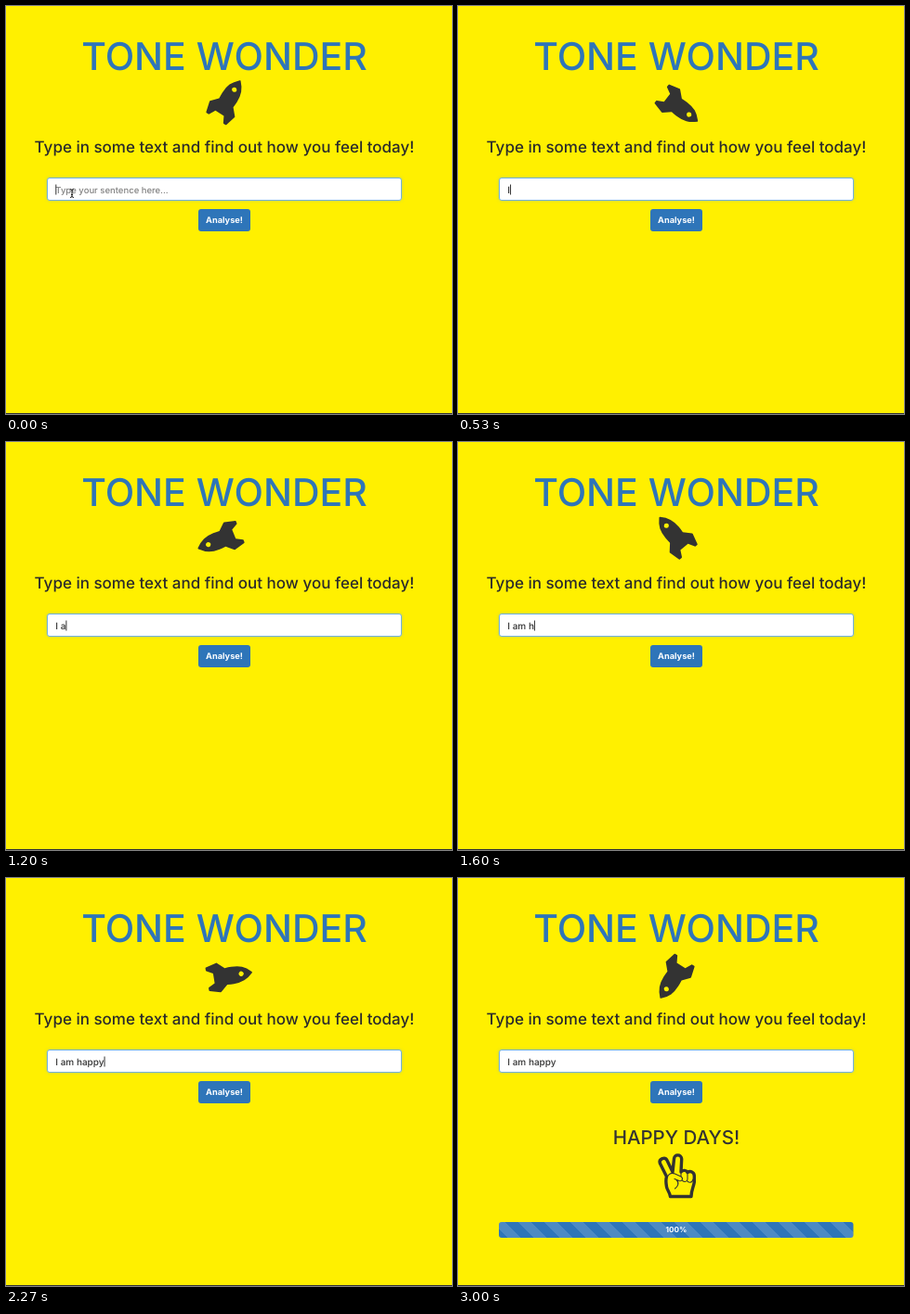
These frames come from a looping animation (480 px wide and 440 px high, 3.07 s). An HTML page:

```html
<!DOCTYPE html>
<html lang="en">
<head>
<meta charset="utf-8">
<title>Tone Wonder</title>
<style>
  html, body { margin: 0; width: 100%; height: 100%; overflow: hidden; background: #fff000; }
  svg { display: block; }
  text {
    font-family: Inter, "Open Sans", sans-serif;
    font-weight: 500;
    font-optical-sizing: none;
    text-rendering: geometricPrecision;
    fill: #333;
    white-space: pre;
  }
  .mid { text-anchor: middle; }
  .title { font-size: 41px; fill: #2e75b9; }
  .tagline { font-size: 17px; fill: #2b2b2b; }
  .hint { font-size: 9.5px; fill: #808080; }
  .typed { font-size: 10px; }
  .label { font-size: 9.2px; font-weight: 700; fill: #fff; }
  .verdict { font-size: 20.5px; }
  .percent { font-size: 8.2px; font-weight: 700; fill: #fff; }
  .field { fill: #fff; stroke: #72b0e0; filter: drop-shadow(0 0 1.5px rgba(102, 175, 233, .5)); }
  .hand { fill: none; stroke: #333; stroke-linejoin: round; stroke-linecap: round; }
</style>
</head>
<body>
<svg width="480" height="440" viewBox="0 0 480 440">
  <defs>
    <pattern id="stripes" width="28" height="28" patternUnits="userSpaceOnUse">
      <rect width="14" height="28" fill="#fff" fill-opacity=".15"/>
    </pattern>
  </defs>
  <rect width="480" height="440" fill="#fff000"/>
  <rect y="439" width="480" height="1" fill="#333"/>

  <text class="mid title" x="235" y="68.6">TONE WONDER</text>
  <path id="rocket" fill="#333" fill-rule="evenodd" d="M1440 1088a96 96 0 1 0-192 0a96 96 0 1 0 192 0z
    M1671 1376q0-249-75.5-430.5t-253.5-360.5q-81-80-195-176l-20-379q-2-16-16-26l-384-224q-7-4-16-4
    q-12 0-23 9l-64 64q-13 14-8 32l85 276l-281 281l-276-85q-3-1-9-1q-14 0-23 9l-64 64q-17 19-5 39
    l224 384q10 14 26 16l379 20q96 114 176 195q188 187 358 258t431 71q14 0 24-9.5t10-22.5z"/>
  <text class="mid tagline" x="235" y="158">Type in some text and find out how you feel today!</text>

  <rect class="field" x="44.5" y="185.5" width="381" height="24" rx="2.5"/>
  <text class="hint" id="hint" x="53.3" y="201.5">Type your sentence here...</text>
  <text class="typed" id="typed" x="53.3" y="201.5"></text>
  <rect id="caret" y="192.5" width="1" height="11" fill="#333"/>
  <path id="pointer" d="M69 197.5q2 0 2 1.5v6q0 1.5-2 1.5M73 197.5q-2 0-2 1.5M73 206.5q-2 0-2-1.5M70 203.5h2"
    fill="none" stroke="#222"/>

  <rect x="207" y="219" width="56" height="24" rx="3" fill="#2e75b9"/>
  <text class="mid label" x="235" y="234.3">Analyse!</text>

  <g id="result">
    <text class="mid verdict" x="235" y="287">HAPPY DAYS!</text>
    <g class="hand" transform="translate(215 297)">
      <path stroke-width="3.4" d="M9.5 25L2.3 10.5C.9 6 7.8 3 10 7.5L16 20L17.5 6C17.5 .5 25.5 .5 25.7 6
        L25 20C27 17.5 31 18 32 20.5C35 18.5 39 20 39.3 24V31C38.5 36 36 40 36 46.5H13.5
        C13 42 10 39.5 9.5 36C8.8 32 8.5 28 9.5 25z"/>
      <path stroke-width="1.1" d="M10.5 25C13 20.5 16 21 18.5 22L25 25C28 27 26 30.5 23 29.5L18 27.5
        M20 28.5C24 32 21 36 18.5 38M25 20V25M32 21V28C31.5 31 27.5 31.5 26 28.5M38 28C37 32 33 32 31.5 29.5"/>
    </g>
    <rect x="44" y="371" width="381.5" height="17" rx="3" fill="#2e75b9"/>
    <rect x="44" y="371" width="381.5" height="17" rx="3" fill="url(#stripes)"/>
    <text class="mid percent" x="235" y="381.6">100%</text>
  </g>
</svg>
<script>
  const LOOP = 3070, STEPS = 46, RESULT_AT = 2470;
  const SENTENCE = "I am happy";
  const KEY_TIMES = [470, 800, 1130, 1330, 1470, 1600, 1730, 1870, 2070, 2200];
  const ICON = 48 / 1792;

  const byId = id => document.getElementById(id);
  const [rocket, hint, typed, caret, pointer, result, stripes] =
    ["rocket", "hint", "typed", "caret", "pointer", "result", "stripes"].map(byId);
  const show = (el, on) => el.setAttribute("visibility", on ? "visible" : "hidden");

  // Screen updates come 15 times a second, rounded to 10 ms.
  const ticks = Array.from({ length: STEPS }, (_, i) => Math.round(i * 20 / 3) * 10);
  const snap = t => ticks.filter(tick => tick <= t).pop();

  function draw(t) {
    const angle = t * 0.18 - 12.8;
    rocket.setAttribute("transform",
      `translate(235 105) rotate(${angle}) scale(${ICON} ${-ICON}) translate(-832 -640)`);

    const count = KEY_TIMES.filter(k => k <= t).length;
    typed.textContent = SENTENCE.slice(0, count);
    caret.setAttribute("x", 53.3 + (count ? typed.getComputedTextLength() : 0));
    show(hint, !count);
    show(pointer, !count);

    const done = t >= RESULT_AT;
    show(caret, !done);
    show(result, done);
    const shift = 44 - (t - RESULT_AT) * 0.014;
    stripes.setAttribute("patternTransform", `translate(${shift} 371) skewX(45)`);
  }

  const start = performance.now();
  function frame() {
    draw(snap((performance.now() - start) % LOOP));
    requestAnimationFrame(frame);
  }
  frame();
</script>
</body>
</html>
```
